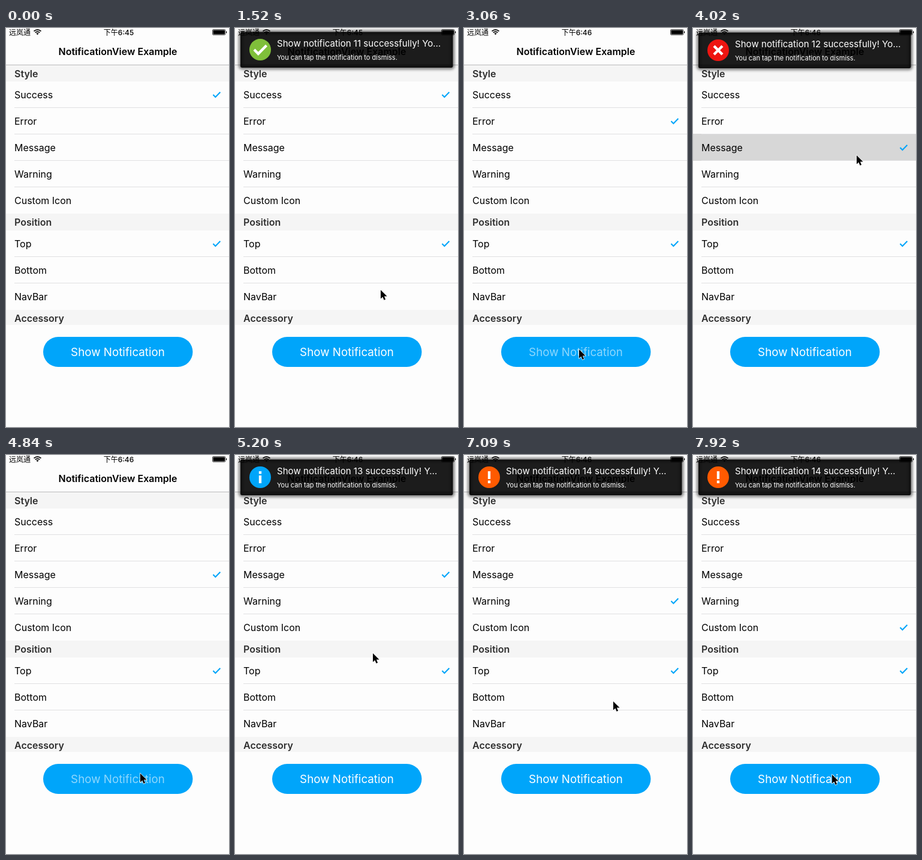
Recreate the animation shown at these times as an HTML page. Size 372 by 664 pixels, loop 8 s.

```html
<!DOCTYPE html>
<html lang="en">
<head>
<meta charset="utf-8">
<title>Notification demo</title>
<style>
html, body { margin: 0; width: 100%; height: 100%; overflow: hidden; background: #fdfdfd; }
svg { display: block; width: 372px; height: 664px; }
text { font: 16px Inter, "Noto Sans CJK SC", "Noto Sans CJK", sans-serif; white-space: pre; }
text.bold { font-weight: 600; }
text.head { font-weight: 600; fill: #2e2e2e; }
text.status { font-size: 12px; font-weight: 500; }
text.button { font-size: 18.8px; fill: #fff; }
text.title { font-size: 15.1px; fill: #fff; }
text.body { font-size: 11px; fill: #fff; }
.tick { fill: none; stroke: #00a5fa; stroke-width: 2.1; }
.mark { fill: none; stroke: #fff; stroke-width: 4.3; }
</style>
</head>
<body>
<svg viewBox="0 0 372 664">
  <defs>
    <filter id="soft" x="-10%" y="-50%" width="120%" height="200%"><feGaussianBlur stdDeviation="2.6"/></filter>
  </defs>

  <g id="list"></g>
  <path class="tick" d="M345.5 359l3.9 4 8-8.3"/>
  <path class="tick" id="tick" d="M345.5 111l3.9 4 8-8.3"/>

  <rect y="61" width="372" height="1" fill="#b9b9bb"/>
  <text class="bold" x="186.5" y="45" text-anchor="middle">NotificationView Example</text>

  <text class="status" x="5" y="11.5">远岚通</text>
  <g fill="none" stroke="#000" stroke-width="1.7">
    <path d="M46.5 5.4Q52.5 .2 58.5 5.4M48.7 7.7Q52.5 4.4 56.3 7.7"/>
    <path d="M50.4 9L52.5 11.4 54.6 9Q52.5 7.4 50.4 9Z" fill="#000" stroke="none"/>
  </g>
  <text class="status" id="clock" x="188" y="11.5" text-anchor="middle"></text>
  <rect x="344.5" y="2.5" width="21.5" height="9" rx="1.5" fill="none" stroke="#000" stroke-width=".7"/>
  <rect x="345.5" y="3.4" width="19.5" height="7.2" rx=".8"/>
  <path d="M367 5.2q1.4 .3 1.4 1.8t-1.4 1.8z"/>

  <rect x="62" y="514" width="249.5" height="50" rx="25" fill="#00a5fa"/>
  <text class="button" id="label" x="186.5" y="546" text-anchor="middle">Show Notification</text>

  <g id="banner">
    <rect x="9" y="7.5" width="354.5" height="59.5" rx="3" fill="none" stroke="#000" stroke-width="5" opacity=".6" filter="url(#soft)"/>
    <rect x="9" y="7.5" width="354.5" height="59.5" rx="3" fill="#000" opacity=".89"/>
    <circle id="disc" cx="42" cy="37" r="18"/>
    <path class="mark" id="mark"/>
    <text class="title" id="title" x="70" y="32"></text>
    <text class="body" x="70" y="53.5">You can tap the notification to dismiss.</text>
  </g>

  <path id="cursor" d="M0 0V14.6L3.4 11.5 5.6 16.8 8.1 15.8 5.9 10.6H10.6Z" stroke="#fff" stroke-width="1.3" paint-order="stroke"/>
</svg>
<script>
const LOOP = 8000, TICK = 118.4, ROW = 44;
const $ = id => document.getElementById(id);
const clamp = v => Math.min(1, Math.max(0, v));

const sections = [
  { y: 62, head: 28, bar: 27, name: 'Style', rows: ['Success', 'Error', 'Message', 'Warning', 'Custom Icon'] },
  { y: 309, head: 28, bar: 28, name: 'Position', rows: ['Top', 'Bottom', 'NavBar'] },
  { y: 469, head: 25, bar: 25, name: 'Accessory', rows: [] }
];

function buildList() {
  let out = '<rect id="glow" y="176" width="372" height="45" fill="#d7d7d7"/>';
  for (const s of sections) {
    out += `<rect y="${s.y}" width="372" height="${s.bar}" fill="#f5f5f5"/>
      <text class="head" x="14" y="${s.y + 20}">${s.name}</text>`;
    const top = s.rows.length === 5 ? 89 : s.y + s.head;
    s.rows.forEach((name, i) => {
      const y = top + i * ROW;
      out += `<text x="14" y="${y + 28}">${name}</text>`;
      if (i < s.rows.length - 1) out += `<rect x="14" y="${y + 43}" width="358" height="1" fill="#e0e0e2"/>`;
    });
  }
  $('list').innerHTML = out;
}

// Button presses: each replaces the banner on screen.
const presses = [
  { at: 1165, title: '11 successfully! Yo…', color: '#7fbf3a', mark: 'M32 37l6.8 6.8L52.5 30' },
  { at: 2940, title: '12 successfully! Yo…', color: '#ee1511', mark: 'M35 30l14 14M49 30L35 44' },
  { at: 4715, title: '13 successfully! Y…', color: '#00a5fa', mark: 'M42 27v4.4M42 34v13' },
  { at: 6610, title: '14 successfully! Y…', color: '#ff5a00', mark: 'M42 27v13M42 42.5v4.4' }
];

// Times at which the next style row is picked.
const picks = [1990, 4005, 5780, 7440];

// Pointer path: time, x, y.
const path = [
  [500, 319, 506], [850, 212, 531], [1290, 212, 531], [1406, 222, 502], [1525, 243, 436],
  [1762, 262, 220], [1880, 264, 155], [2120, 264, 155], [2355, 230, 370], [2591, 195, 520],
  [2710, 192, 535], [3300, 192, 535], [3540, 218, 490], [3893, 273, 212], [4130, 273, 212],
  [4370, 245, 440], [4604, 224, 530], [4840, 224, 530], [4960, 226, 490], [5195, 230, 330],
  [5550, 240, 243], [5900, 240, 243], [6260, 248, 460], [6500, 253, 532], [6850, 253, 532],
  [7090, 249, 410], [7330, 245, 288], [7560, 245, 288], [7915, 232, 532]
];

function pointer(t) {
  const i = path.findIndex(p => p[0] > t);
  if (i < 0) return path[path.length - 1].slice(1);
  const [t0, x0, y0] = path[i - 1], [t1, x1, y1] = path[i];
  const u = (t - t0) / (t1 - t0);
  return [x0 + (x1 - x0) * u, y0 + (y1 - y0) * u];
}

function stepTime(t) {
  const start = t < 1000 ? 500 : 1170;
  return Math.max(0, start + Math.floor((t - start + 5) / TICK) * TICK);
}

function draw(t) {
  const press = presses.filter(p => p.at <= t).pop();
  const age = press ? t - press.at : LOOP;
  const slide = (age - 130) / 300;

  $('label').setAttribute('opacity', clamp(0.3 + 0.7 * age / 340));
  $('banner').style.display = press && slide > 0 ? '' : 'none';
  if (press) {
    $('banner').setAttribute('transform', `translate(0 ${-74 * (1 - clamp(slide)) ** 3})`);
    $('title').textContent = 'Show notification ' + press.title;
    $('disc').setAttribute('fill', press.color);
    $('mark').setAttribute('d', press.mark);
  }

  const row = picks.filter(p => p <= t).length;
  $('tick').setAttribute('transform', `translate(0 ${row * ROW})`);
  $('glow').setAttribute('y', 88 + row * ROW);
  $('glow').setAttribute('opacity', row ? 1 - clamp((t - picks[row - 1] - 130) / 300) : 0);

  $('clock').textContent = t < 2300 ? '下午6:45' : '下午6:46';

  $('cursor').style.display = t < 500 ? 'none' : '';
  if (t >= 500) $('cursor').setAttribute('transform', `translate(${pointer(t).map(Math.round)})`);
}

function frame() {
  draw(stepTime(performance.now() % LOOP));
  requestAnimationFrame(frame);
}

buildList();
frame();
</script>
</body>
</html>
```
